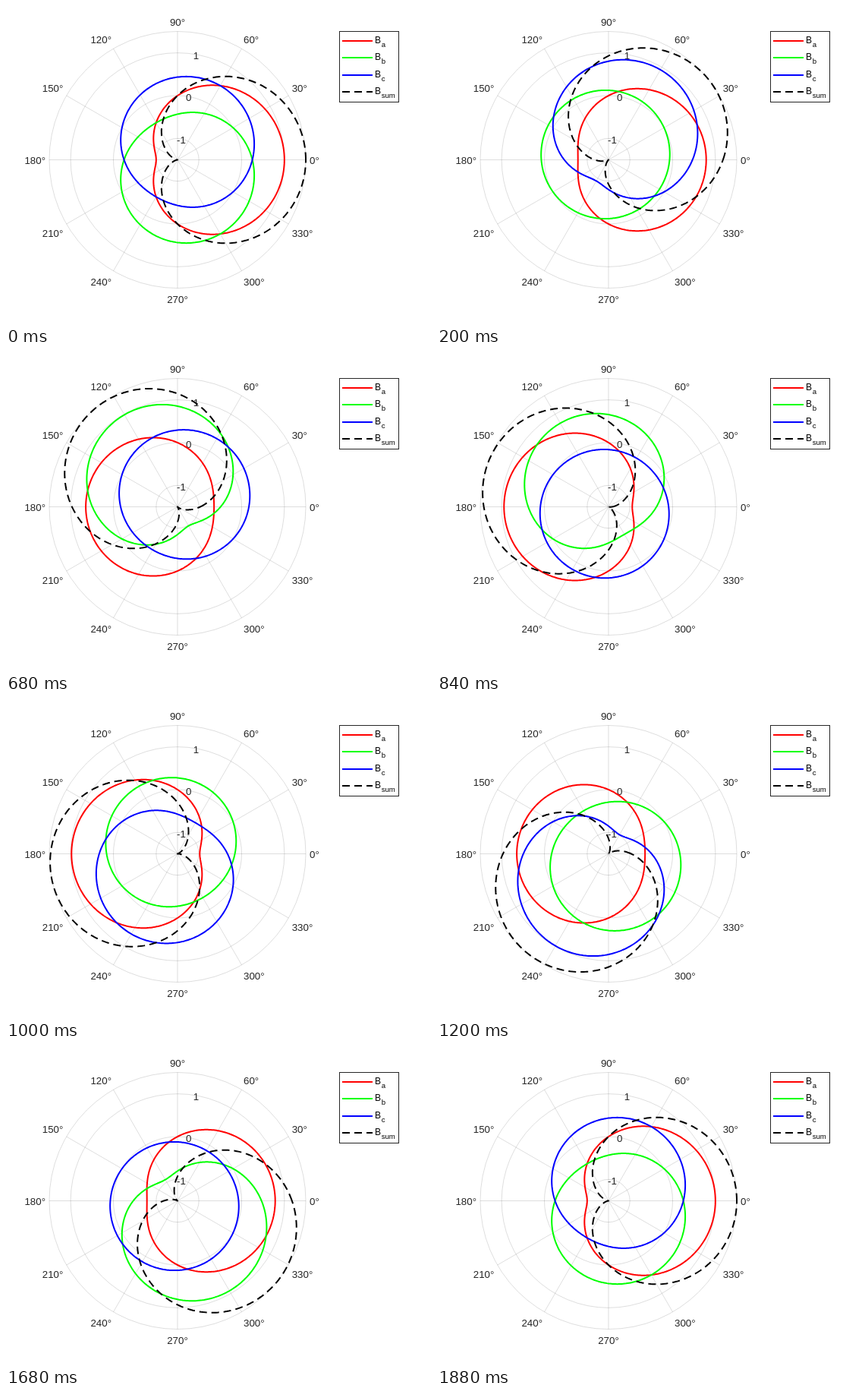
These frames come from a looping animation (560x420 px, 1.92 s). An HTML page:

```html
<!DOCTYPE html>
<html lang="en">
<head>
<meta charset="utf-8">
<title>Three-phase rotating field</title>
<style>
html, body { margin: 0; width: 100%; height: 100%; overflow: hidden; background: #fff; }
svg { display: block; font-family: "Liberation Sans", Arial, sans-serif; }
</style>
</head>
<body>
<svg id="stage" width="560" height="420" viewBox="0 0 560 420"></svg>
<script>
const STEP_MS = 40, STEPS = 48;
const CX = 226, CY = 202.5, RADIUS = 169, LIMIT = 1.5;
const DEG = Math.PI / 180;
const stage = document.getElementById('stage');

function add(tag, attrs, text, parent = stage) {
  const node = document.createElementNS('http://www.w3.org/2000/svg', tag);
  for (const key in attrs) node.setAttribute(key, attrs[key]);
  if (text) node.textContent = text;
  return parent.appendChild(node);
}

const toPixels = value => (value + LIMIT) / (2 * LIMIT) * RADIUS;
const polar = (radius, angle) =>
  [CX + radius * Math.cos(angle), CY - radius * Math.sin(angle)];

function drawGrid() {
  const grid = add('g', { fill: 'none', stroke: '#262626', 'stroke-opacity': 0.15 });
  for (const value of [-1, 0, 1, LIMIT])
    add('circle', { cx: CX, cy: CY, r: toPixels(value) }, '', grid);
  for (let a = 0; a < 360; a += 30) {
    const [x2, y2] = polar(RADIUS, a * DEG);
    add('line', { x1: CX, y1: CY, x2, y2 }, '', grid);
  }

  const labels = add('g', { fill: '#262626', 'font-size': 13.333 });
  for (let a = 0; a < 360; a += 30) {
    const [x, y] = polar(RADIUS + 5, a * DEG);
    const side = Math.round(Math.cos(a * DEG) * 10);
    const rise = Math.round(Math.sin(a * DEG) * 10);
    const anchor = side > 0 ? 'start' : side < 0 ? 'end' : 'middle';
    const drop = rise > 0 ? -3 : rise < 0 ? 14.5 : 5.5;
    add('text', { x, y: y + drop, 'text-anchor': anchor }, a + '°', labels);
  }
  for (const value of [-1, 0, 1]) {
    const [x, y] = polar(toPixels(value), 80 * DEG);
    add('text', { x, y: y + 6, 'text-anchor': 'middle' }, String(value), labels);
  }
}

const phase = shift => (angle, time) => Math.cos(time - shift) * Math.cos(angle - shift);
const curves = [
  { name: 'a', color: '#f00', field: phase(0) },
  { name: 'b', color: '#0f0', field: phase(120 * DEG) },
  { name: 'c', color: '#00f', field: phase(240 * DEG) },
  { name: 'sum', color: '#000', dash: '10 6', field: (angle, time) => LIMIT * Math.cos(angle - time) }
];

const strokeOf = ({ color, dash = 'none' }) => ({
  fill: 'none', stroke: color, 'stroke-width': 2,
  'stroke-linejoin': 'round', 'stroke-dasharray': dash
});

function drawLegend() {
  add('rect', { x: 439.5, y: 33.5, width: 78, height: 93, fill: '#fff', stroke: '#262626' });
  curves.forEach((curve, i) => {
    const y = Math.round(46 + 22.4 * i);
    add('path', { d: `M443 ${y}H483`, ...strokeOf(curve) });
    const label = add('text', { x: 486, y: y + 3, 'font-size': 12 }, 'B');
    add('tspan', { dx: 0.7, dy: 5, 'font-size': 9.6 }, curve.name, label);
  });
}

function curvePath(field, time) {
  const points = [];
  for (let a = 0; a <= 360; a++) {
    const [x, y] = polar(toPixels(field(a * DEG, time)), a * DEG);
    points.push(x.toFixed(2) + ' ' + y.toFixed(2));
  }
  return 'M' + points.join('L');
}

function render(ms) {
  // The sweep includes both 0 and 360 degrees, so the pose holds across the loop.
  const step = Math.floor(ms / STEP_MS) % STEPS;
  const time = step / (STEPS - 1) * 2 * Math.PI;
  for (const curve of curves) curve.path.setAttribute('d', curvePath(curve.field, time));
}

drawGrid();
for (const curve of curves) curve.path = add('path', strokeOf(curve));
drawLegend();

function tick() {
  render(performance.now() - start);
  requestAnimationFrame(tick);
}
const start = performance.now();
tick();
</script>
</body>
</html>
```
